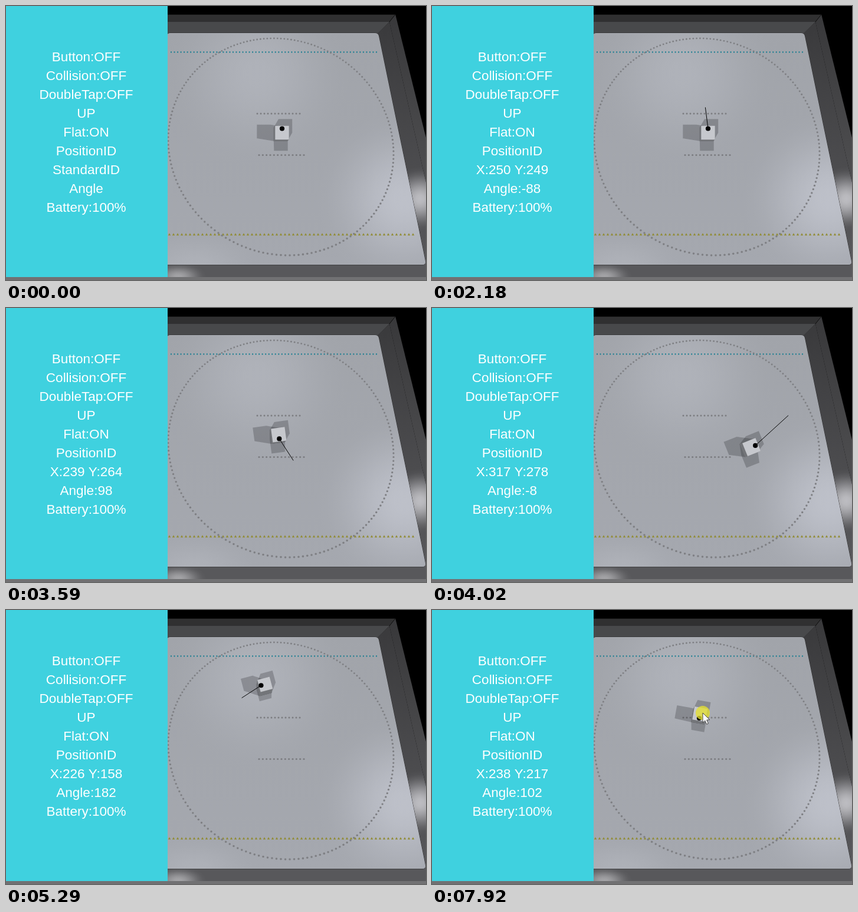
An HTML page with a canvas for the animation above (8 s loop, 712 by 466 pixels).

```html
<!DOCTYPE html>
<html lang="en">
<head>
<meta charset="utf-8">
<title>Cube simulator</title>
<style>
html, body { margin: 0; width: 100%; height: 100%; overflow: hidden; background: #000; }
canvas { display: block; }
</style>
</head>
<body>
<canvas id="stage" width="712" height="466"></canvas>
<script>
const W = 712, H = 466, LOOP = 8000, PANEL = 274, TAU = Math.PI * 2;
const GRAB = 1930, RELEASE = 5650;
const ctx = document.getElementById('stage').getContext('2d');

const rad = deg => deg * Math.PI / 180;
const mix = (a, b, u) => a + (b - a) * u;
function ease(t, t0, t1) {
  const u = Math.min(1, Math.max(0, (t - t0) / (t1 - t0)));
  return u * u * (3 - 2 * u);
}
const glide = (t, t0, t1, from, to) => from.map((v, i) => mix(v, to[i], ease(t, t0, t1)));

// The pointer circles the mat counterclockwise and the cube trails behind it.
const orbit = t => 172 - .1556 * (t - 3050);
const wave = (t, centre, radius, phase) => centre + radius * Math.cos(rad(orbit(t) + phase));

// Leaves one resting value for the circling motion, then settles on another.
const chase = (t, rest, moving, end) =>
  mix(mix(rest, moving, ease(t, 2180, 3050)), end, ease(t, 4950, 5850));

const cubeX = t => chase(t, 468, wave(t, 492.5, 78.6, 24), 453);
const cubeY = t => chase(t, 208.5, wave(t, 160.7, 81.5, -47), 184);
const readX = t => chase(t, 250, wave(t, 276.7, 71.1, 34.4), 238);
const readY = t => chase(t, 249, wave(t, 196, 90.65, -46.25), 217);
const readAngle = t => chase(t, -88, orbit(t) + wave(t, -359.4, -37.9, 17.5), -618);

function pointer(t) {
  if (t < 650) return glide(t, 200, 540, [674, 450], [449, 199]);
  if (t < GRAB) return glide(t, 700, 920, [449, 199], [468, 220]);
  if (t >= RELEASE) return glide(t, 5890, 6290, [465, 187], [459, 175]);
  const circling = [wave(t, 482.2, 130.5, 0), wave(t, 133.8, 125.6, -88)];
  return glide(t, 5000, RELEASE, glide(t, 2000, 3050, [455, 184], circling), [465, 187]);
}

function trace(g, points) {
  g.beginPath();
  points.forEach(p => g.lineTo(p[0], p[1]));
  g.closePath();
}

function poly(g, points, fill) {
  trace(g, points);
  g.fillStyle = fill;
  g.fill();
}

function dot(g, x, y, r, fill) {
  g.fillStyle = fill;
  g.beginPath();
  g.arc(x, y, r, 0, TAU);
  g.fill();
}

function glow(g, x, y, r, color, alpha, squash = 1) {
  g.save();
  g.translate(x, y);
  g.scale(1, squash);
  const grad = g.createRadialGradient(0, 0, 0, 0, 0, r);
  for (let u = 0; u <= 1; u += .125) {
    grad.addColorStop(u, `rgba(${color},${alpha * (1 - ease(u, 0, 1))})`);
  }
  g.fillStyle = grad;
  g.fillRect(-r, -r, 2 * r, 2 * r);
  g.restore();
}

function vertical(g, y0, c0, y1, c1) {
  const grad = g.createLinearGradient(0, y0, 0, y1);
  grad.addColorStop(0, c0);
  grad.addColorStop(1, c1);
  return grad;
}

function paintWalls(g) {
  g.fillStyle = '#000';
  g.fillRect(0, 0, W, H);
  poly(g, [[270, 14], [660, 14], [650, 27], [270, 27]], '#303031');
  poly(g, [[270, 27], [650, 27], [630, 47], [270, 47]], '#48494b');
  poly(g, [[660, 14], [712, 224], [712, 300], [650, 27]], vertical(g, 14, '#38383a', 260, '#4c4c4e'));
  g.save();
  trace(g, [[650, 27], [712, 300], [712, 461], [270, 461], [270, 430], [630, 46]]);
  g.clip();
  g.fillStyle = vertical(g, 40, '#3b3b3d', 440, '#58585b');
  g.fillRect(270, 20, 442, 441);
  glow(g, 702, 328, 55, '225,225,230', .75);
  glow(g, 292, 460, 48, '215,215,218', .6, .5);
  g.restore();
  g.strokeStyle = '#101010';
  g.lineWidth = 1;
  g.beginPath();
  g.moveTo(270, 14.5);
  g.lineTo(660, 14.5);
  g.lineTo(650, 27);
  g.stroke();
}

function paintMat(g) {
  g.save();
  g.beginPath();
  g.moveTo(278, 46);
  g.lineTo(625, 46);
  g.quadraticCurveTo(631, 46, 632, 51);
  g.lineTo(711, 434);
  g.quadraticCurveTo(712, 440, 706, 440);
  g.lineTo(270, 440);
  g.lineTo(270, 54);
  g.quadraticCurveTo(273, 46, 278, 46);
  g.strokeStyle = '#2a2a2b';
  g.lineWidth = 1;
  g.stroke();
  g.clip();
  g.fillStyle = vertical(g, 46, '#a1a4aa', 440, '#a5a8af');
  g.fillRect(270, 40, 442, 405);
  glow(g, 425, 115, 160, '186,189,197', .55);
  glow(g, 675, 328, 150, '203,206,216', .65);
  glow(g, 320, 440, 110, '185,188,195', .45, .5);
  g.restore();
}

function paintMarks(g) {
  const row = (x0, x1, n, mark) => {
    for (let i = 0; i < n; i++) mark(mix(x0, x1, i / (n - 1)));
  };
  row(280, 628, 64, x => dot(g, x, 78.5, 1.15, '#187d91'));
  row(426, 498, 13, x => dot(g, x, 183, 1.5, '#7c7d81'));
  row(429, 505, 13, x => dot(g, x, 253.5, 1.6, '#7c7d81'));
  row(277, 690, 60, x => poly(g, [[x, 386.3], [x + 2.2, 390.2], [x - 2.2, 390.2]], '#918c35'));
  // Perspective packs the ring's dots closer at the top.
  row(0, TAU, 181, a => {
    const turn = a - .13 * Math.cos(a);
    const y = 239.5 + 184.5 * Math.sin(turn + .065);
    dot(g, 466 + 191 * Math.cos(turn), y, 1.35 + y * .001, '#7e7f83');
  });
}

function makeBackdrop() {
  const layer = document.createElement('canvas');
  layer.width = W;
  layer.height = H;
  const g = layer.getContext('2d');
  paintWalls(g);
  paintMat(g);
  paintMarks(g);
  g.fillStyle = '#3fd1df';
  g.fillRect(0, 0, PANEL, 461);
  g.fillStyle = '#717173';
  g.fillRect(0, 461, W, 5);
  return layer;
}

// Fills the area a square covers while sliding from one offset to another.
function sweep(corners, from, to, fill) {
  const steps = 32;
  ctx.beginPath();
  for (let i = 0; i <= steps; i++) {
    const dx = mix(from[0], to[0], i / steps), dy = mix(from[1], to[1], i / steps);
    corners.forEach(([x, y], k) => k ? ctx.lineTo(x + dx, y + dy) : ctx.moveTo(x + dx, y + dy));
    ctx.closePath();
  }
  ctx.fillStyle = fill;
  ctx.fill();
}

function drawCube(x, y, heading, sink) {
  const dir = rad(heading);
  const cx = x - 7 * Math.cos(dir), cy = y - 7 * Math.sin(dir) + sink;
  const rise = 216 - cy, scale = 1 - rise * .001, reach = 11.7 * scale * Math.SQRT2;
  const top = [45, 135, 225, 315].map(a =>
    [cx + reach * Math.cos(dir + rad(a)), cy + reach * Math.sin(dir + rad(a))]);
  const base = [-2.5 - (cx - 468) * .03, 2.5 + rise * .05];
  for (const [dx, dy] of [[-31, -2], [5.5, -11.5], [-2, 19 - rise * .02]]) {
    sweep(top, base, [dx * scale, dy * scale], 'rgba(20,21,24,.23)');
  }
  sweep(top, base, [0, 0], '#737579');
  poly(ctx, top, '#c6c8cd');
  dot(ctx, x, y + sink, 4.1, '#000');
}

function drawPointer(x, y) {
  const shape = [[0, 0], [0, 16.5], [3.8, 13], [6.6, 19.3], [9.4, 18], [6.7, 12], [11.7, 11.7]];
  poly(ctx, shape.map(p => [x + p[0], y + p[1]]), '#fff');
  ctx.strokeStyle = '#333';
  ctx.lineWidth = .9;
  ctx.stroke();
}

function drawText(t, pressed) {
  const onMat = t >= GRAB;
  const angle = ((Math.round(readAngle(t)) + 90) % 360 + 360) % 360 - 90;
  const lines = [
    'Button:' + (pressed ? 'ON' : 'OFF'), 'Collision:OFF', 'DoubleTap:OFF', 'UP', 'Flat:ON', 'PositionID',
    onMat ? `X:${Math.round(readX(t))} Y:${Math.round(readY(t))}` : 'StandardID',
    onMat ? `Angle:${angle}` : 'Angle',
    'Battery:100%'
  ];
  ctx.font = '22.5px "Liberation Sans", Arial, sans-serif';
  ctx.textAlign = 'center';
  ctx.fillStyle = '#fff';
  lines.forEach((line, i) => ctx.fillText(line, 136, 94 + 32 * i));
}

const within = (t, ...spans) => spans.some(([a, b]) => t >= a && t < b);
const backdrop = makeBackdrop();

function render(t) {
  const pressed = within(t, [6370, 6680], [7220, 7480]);
  const clicked = within(t, [1770, GRAB], [6290, 6680], [7220, 7540], [7920, LOOP]);
  const dragging = within(t, [GRAB, RELEASE]);
  const x = cubeX(t), y = cubeY(t), [px, py] = pointer(t);
  ctx.drawImage(backdrop, 0, 0);
  // The readout lags the cube's visible turn slightly.
  drawCube(x, y, readAngle(t + 55) - 2, pressed ? 1 : 0);
  if (dragging) {
    ctx.strokeStyle = '#000';
    ctx.lineWidth = 1;
    ctx.beginPath();
    ctx.moveTo(x, y);
    ctx.lineTo(px, py);
    ctx.stroke();
  }
  if (clicked) dot(ctx, px, py, 12, 'rgba(228,224,48,.78)');
  if (t >= 220 && !dragging) drawPointer(px, py);
  drawText(t, pressed);
}

const start = performance.now();
function tick() {
  render((performance.now() - start) % LOOP);
  requestAnimationFrame(tick);
}
tick();
</script>
</body>
</html>
```
